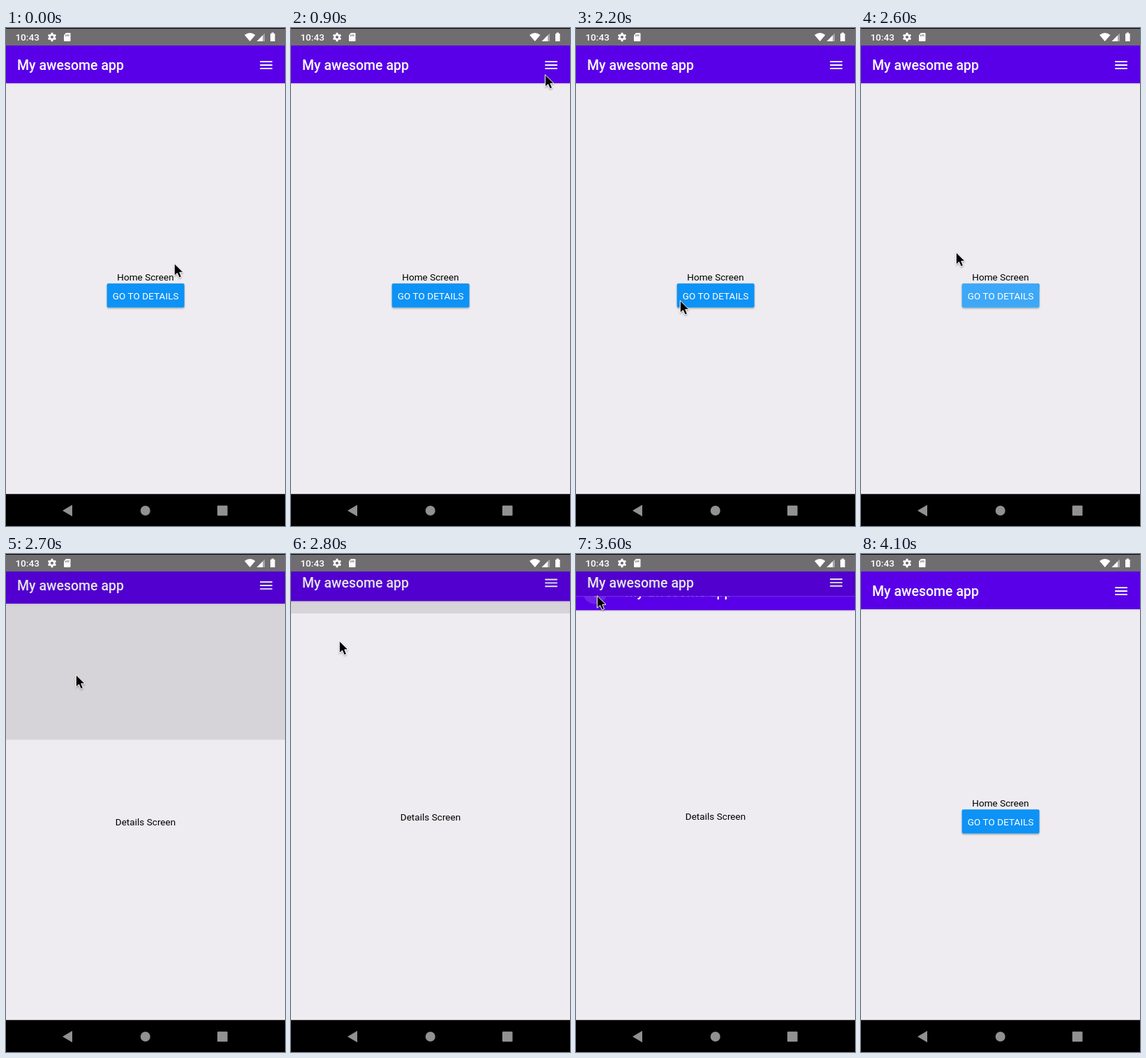
These frames come from a looping animation (400 px wide and 712 px high, 4200 ms). An HTML page:

```html
<!DOCTYPE html>
<html lang="en">
<head>
<meta charset="utf-8">
<title>App navigation</title>
<style>
  html, body { margin: 0; width: 100%; height: 100%; overflow: hidden; background: #000; }
  svg { display: block; width: 100%; height: 100%; }
  text { font-family: Roboto, sans-serif; font-size: 13.6px; }
  .title { font-size: 19.5px; font-weight: 450; fill: #fff; }
  .mid { text-anchor: middle; }
  .bg { fill: #eeecf0; }
  .bar { fill: #5a00e8; }
  .white { fill: #fff; }
</style>
</head>
<body>
<svg viewBox="0 0 400 712">
  <defs>
    <clipPath id="stage"><rect y="25" width="400" height="642"/></clipPath>
    <clipPath id="reveal"><rect id="revealBox" y="25" width="400" height="642"/></clipPath>
    <clipPath id="btnClip"><rect x="144.7" y="365.3" width="111" height="34.3" rx="2"/></clipPath>
    <linearGradient id="shade" x2="0" y2="1">
      <stop stop-opacity=".08"/><stop offset="1" stop-opacity="0"/>
    </linearGradient>
    <filter id="soft" x="-50%" y="-50%" width="200%" height="200%">
      <feDropShadow dx="0" dy="1.3" stdDeviation="1.2" flood-opacity=".35"/>
    </filter>
  </defs>

  <g clip-path="url(#stage)">
    <g id="home">
      <rect class="bg" y="25" width="400" height="660"/>
      <rect class="bar" y="25" width="400" height="54"/>
      <rect y="79" width="400" height="3" fill="url(#shade)"/>
      <text class="title" x="16" y="60">My awesome app</text>
      <circle id="menuRipple" class="white" cx="373" cy="53"/>
      <path d="M364.200 48.100h17.600M364.200 53h17.600M364.200 57.900h17.600" stroke="#fff" stroke-width="1.900"/>
      <text class="mid" x="200" y="361">Home Screen</text>
      <rect x="144.7" y="365.3" width="111" height="34.3" rx="2" fill="#0d92f5" filter="url(#soft)"/>
      <g clip-path="url(#btnClip)"><circle id="btnRipple" class="white" cx="152" cy="391"/></g>
      <text class="mid white" x="200.2" y="388">GO TO DETAILS</text>
    </g>
    <rect id="dim" y="25" width="400" height="642"/>
  </g>

  <g id="details" clip-path="url(#reveal)">
    <g id="page">
      <rect class="bg" y="25" width="400" height="660"/>
      <rect class="bar" y="25" width="400" height="54"/>
      <rect y="79" width="400" height="3" fill="url(#shade)"/>
      <circle id="backRipple" class="white" cx="27.3" cy="52.5"/>
      <path class="white" transform="translate(15.6 40.8) scale(.973)"
        d="M20 11v2H8l5.5 5.5-1.42 1.42L4.16 12l7.92-7.92L13.5 5.5 8 11h12z"/>
      <text class="title" x="70.5" y="60">My awesome app</text>
      <text class="mid" x="200" y="378.2">Details Screen</text>
    </g>
  </g>

  <rect width="400" height="25" fill="#6f6d70"/>
  <rect width="400" height="1"/>
  <g class="white">
    <text x="13.4" y="18" font-weight="500">10:43</text>
    <circle cx="66" cy="13" r="3.4" fill="none" stroke="#fff" stroke-width="2.6"/>
    <path id="teeth" stroke="#fff" stroke-width="2.8"/>
    <path d="M86 7h5.5q1 0 1 1v10q0 1-1 1H84q-1 0-1-1V10.2z"/>
    <path d="M85.4 9.6v2.4M87.6 9v3M89.8 9v3" stroke="#6f6d70"/>
    <path d="M342 10Q349.7 4 357.4 10L349.7 19z"/>
    <path d="M371 7.5V19H359.5z" opacity=".4"/>
    <path d="M368 10.5V19H359.5z"/>
    <path d="M379 8h1.7V6.5h3.2V8h1.7V19H379z"/>
  </g>

  <rect y="666.3" width="400" height="45.7"/>
  <g fill="#919191">
    <path d="M81 690l14-8.3v16.6z"/>
    <circle cx="199.8" cy="690" r="7"/>
    <rect x="303" y="682.7" width="14.6" height="14.6" rx="1"/>
  </g>

  <path id="cursor" d="M.3.700V18.200L4.500 14.500 7.300 20.900 10.500 19.500 7.800 13.300H13Z"
    stroke="#fff" stroke-width="1" filter="url(#soft)"/>
</svg>
<script>
const LOOP = 4200, STEP = 100, SLIDE = 425, TOP = 25, HEIGHT = 642;
const el = id => document.getElementById(id);
const set = (id, attrs) => {
  for (const k in attrs) el(id).setAttribute(k, attrs[k]);
};
const clamp = v => Math.min(1, Math.max(0, v));

// pointer stops: time, x, y
const path = [
  [0, 241, 336], [100, 210, 350], [200, 158, 365], [300, 215, 275], [400, 300, 150],
  [500, 356, 53], [600, 333, 72], [700, 350, 70], [800, 366, 60], [900, 364, 66],
  [1300, 364, 66], [1400, 340, 108], [1700, 241, 246], [2100, 147, 387],
  [2200, 149, 389], [2500, 149, 389], [2600, 136, 320], [2700, 100, 172],
  [2900, 38, 75], [3000, 31, 59], [3500, 31, 59], [3600, 30, 59], [3700, 30, 59],
  [3800, 14, 78], [4000, -30, 110], [4200, -30, 110]
];

function pointer(t) {
  const i = path.findIndex(p => p[0] > t);
  const [a, b] = [path[i - 1], path[i]];
  const k = (t - a[0]) / (b[0] - a[0]);
  return [1, 2].map(n => a[n] + (b[n] - a[n]) * k);
}

// cubic-bezier(.20833, .82, .25, 1)
function ease(x) {
  if (x <= 0) return 0;
  if (x >= 1) return 1;
  const curve = (s, a, b) => 3 * (1 - s) ** 2 * s * a + 3 * (1 - s) * s * s * b + s ** 3;
  let lo = 0, hi = 1;
  for (let i = 0; i < 30; i++) {
    const s = (lo + hi) / 2;
    if (curve(s, .20833, .25) < x) lo = s; else hi = s;
  }
  return curve(lo, .82, 1);
}

function ripple(id, t, start, radius, alpha) {
  const k = (t - start) / 400;
  const live = k >= 0 && k < 1;
  set(id, {
    r: live ? radius * clamp(.55 + k * 1.8) : 0,
    opacity: live ? alpha * clamp(2 - 2 * k) : 0
  });
}

function draw(t) {
  const p = ease((t - 2621) / SLIDE) - ease((t - 3594) / SLIDE);
  const drop = (1 - p) * HEIGHT;
  set('home', { transform: `translate(0 ${-.02 * HEIGHT * p})` });
  set('dim', { opacity: .1 * clamp(p / .36) });
  set('details', { visibility: p > 0 ? 'visible' : 'hidden' });
  set('revealBox', { y: TOP + drop, height: HEIGHT - drop });
  set('page', { transform: `translate(0 ${.041 * drop})` });

  ripple('menuRipple', t, 1200, 19.5, .2);
  ripple('btnRipple', t, 2400, 105, .2);
  ripple('backRipple', t, 3500, 17.5, .13);

  const [x, y] = pointer(t);
  set('cursor', { transform: `translate(${x} ${y})` });
}

set('teeth', {
  d: [0, 1, 2].map(i => {
    const a = Math.PI / 6 + i * Math.PI / 3, c = Math.cos(a), s = Math.sin(a);
    return [1, -1].map(d => `M${66 + 3.6 * c * d} ${13 + 3.6 * s * d}L${66 + 6.2 * c * d} ${13 + 6.2 * s * d}`).join('');
  }).join('')
});

const begin = performance.now();
function tick() {
  const t = (performance.now() - begin) % LOOP;
  draw(Math.floor(t / STEP) * STEP);
  requestAnimationFrame(tick);
}
tick();
</script>
</body>
</html>
```
